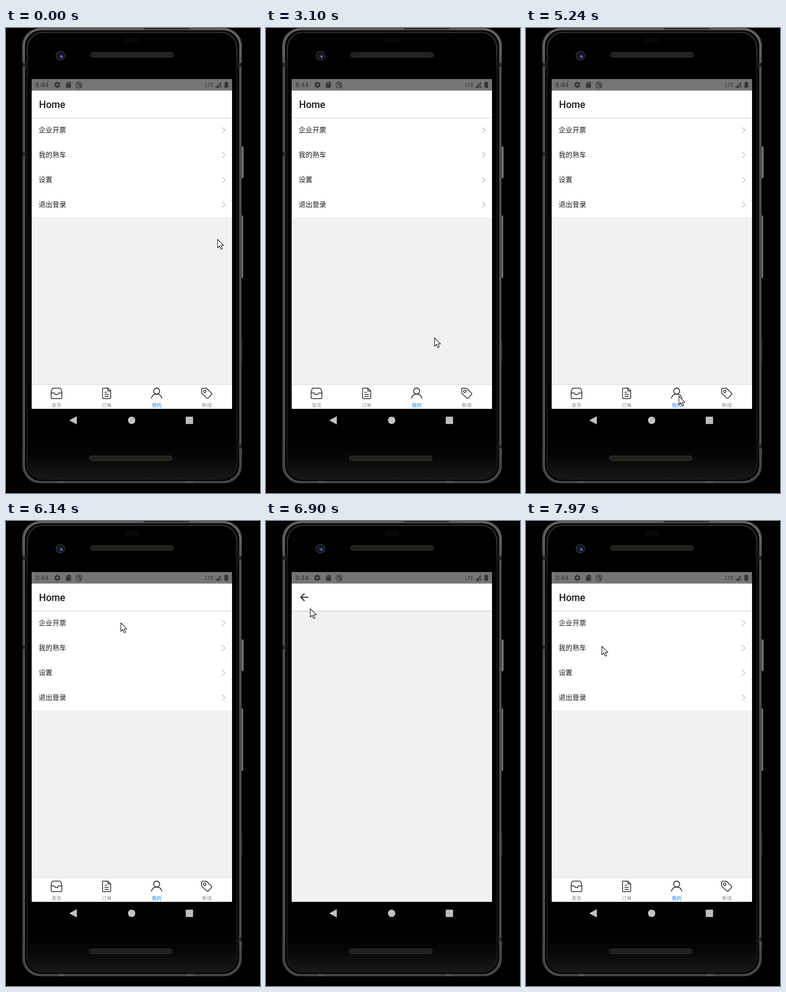
Animation of 554 by 1011 pixels, one loop 8000 ms. Source, as an HTML page with a canvas:

```html
<!DOCTYPE html>
<html lang="zh-CN">
<head>
<meta charset="utf-8">
<title>Phone tabs</title>
<style>
html, body { margin: 0; width: 100%; height: 100%; overflow: hidden; background: #000; }
canvas { display: block; width: 554px; height: 1011px; }
</style>
</head>
<body>
<canvas id="stage"></canvas>
<script>
const W = 554, H = 1011, LOOP = 8000;
const SCREEN = { x: 56, y: 136, w: 437, h: 692 };
const HEADER = 59, ROW = 54, TAB_Y = 776;
const CJK = '"Noto Sans CJK SC", "Noto Sans CJK", sans-serif';
const LATIN = 'Roboto, sans-serif';
const ROWS = ['企业开票', '我的熟车', '设置', '退出登录'];
const TABS = ['发货', '订单', '我的', '新增'];

// Event times in ms
const ADD_TAB = 3560, MINE_TAB = 5200, PUSH = 6371, POP = 7464, SLIDE = 425;

// Pointer path: time, x, y
const PATH = [
  [0, 461, 459], [450, 461, 459], [800, 385, 478], [1060, 323, 492], [1215, 323, 492],
  [1230, 320, 489], [1600, 320, 489], [1635, 322, 486], [1755, 322, 486],
  [1970, 454, 305], [2200, 541, 262], [2400, 500, 266], [2590, 420, 282],
  [2850, 300, 470], [3130, 375, 690], [3390, 433, 793], [3800, 433, 796],
  [4100, 385, 809], [4270, 361, 812], [4550, 333, 800], [5350, 333, 800],
  [5750, 300, 480], [6140, 250, 221], [6330, 140, 243], [6470, 129, 242],
  [6620, 127, 240], [7080, 82, 166], [7350, 82, 166], [7500, 137, 224],
  [7800, 165, 272], [8000, 165, 272]
];

const canvas = document.getElementById('stage');
const ctx = canvas.getContext('2d');
const dpr = window.devicePixelRatio || 1;
canvas.width = W * dpr;
canvas.height = H * dpr;

const clamp = v => Math.max(0, Math.min(1, v));

function rect(x, y, w, h, fill) {
  ctx.fillStyle = fill;
  ctx.fillRect(x, y, w, h);
}

function pill(x, y, w, h, r, fill, stroke, lw = 1) {
  ctx.beginPath();
  ctx.roundRect(x, y, w, h, r);
  if (fill) { ctx.fillStyle = fill; ctx.fill(); }
  if (stroke) { ctx.strokeStyle = stroke; ctx.lineWidth = lw; ctx.stroke(); }
}

function disc(x, y, r, fill) {
  ctx.beginPath();
  ctx.arc(x, y, r, 0, Math.PI * 2);
  ctx.fillStyle = fill;
  ctx.fill();
}

function line(d, stroke, lw, fill) {
  const p = new Path2D(d);
  if (fill) { ctx.fillStyle = fill; ctx.fill(p); }
  if (stroke) { ctx.strokeStyle = stroke; ctx.lineWidth = lw; ctx.stroke(p); }
}

function text(s, x, y, font, fill, align = 'left') {
  ctx.font = font;
  ctx.fillStyle = fill;
  ctx.textAlign = align;
  ctx.fillText(s, x, y);
}

function fade(x0, y0, x1, y1, ...colors) {
  const g = ctx.createLinearGradient(x0, y0, x1, y1);
  colors.forEach((c, i) => g.addColorStop(i / (colors.length - 1), c));
  return g;
}

function at(x, y, draw) {
  ctx.save();
  ctx.translate(x, y);
  draw();
  ctx.restore();
}

// Cubic bezier easing, solved by bisection
function ease(x) {
  const curve = (a, b, s) => 3 * (1 - s) * (1 - s) * s * a + 3 * (1 - s) * s * s * b + s ** 3;
  let lo = 0, hi = 1;
  for (let i = 0; i < 24; i++) {
    const mid = (lo + hi) / 2;
    if (curve(0.20833, 0.25, mid) < x) lo = mid; else hi = mid;
  }
  return curve(0.82, 1, (lo + hi) / 2);
}

// Hermite curve through the path, still at the rests
function pointer(t) {
  let i = 0;
  while (i < PATH.length - 2 && t >= PATH[i + 1][0]) i++;
  const a = PATH[i], b = PATH[i + 1], dt = b[0] - a[0], s = (t - a[0]) / dt;
  const slope = (k, n) => {
    const p = PATH[k - 1], c = PATH[k], q = PATH[k + 1];
    if (!p || !q) return 0;
    const before = (c[n] - p[n]) / (c[0] - p[0]), after = (q[n] - c[n]) / (q[0] - c[0]);
    return before * after <= 0 ? 0 : 2 * before * after / (before + after);
  };
  const mix = n => {
    const s2 = s * s, s3 = s2 * s;
    return (2 * s3 - 3 * s2 + 1) * a[n] + (s3 - 2 * s2 + s) * dt * slope(i, n)
      + (3 * s2 - 2 * s3) * b[n] + (s3 - s2) * dt * slope(i + 1, n);
  };
  return [mix(1), mix(2)];
}

function speaker(x, y) {
  pill(x + 0.5, y + 0.5, 181, 10, 5, '#1d1c19', '#484642');
  for (let i = 0; i < 57; i++) {
    for (let j = 0; j < 2; j++) rect(x + 6 + i * 3 + j * 1.5, y + 3 + j * 3, 1.4, 1.6, '#35332c');
  }
}

// Vertical metal shading: lit ends, even sides
function metal(top, side, bottom) {
  return fade(0, 0, 0, 990, top, top, side, side, side, side, side, side, side, side,
    side, side, side, side, side, side, side, side, side, bottom, bottom);
}

function phone() {
  rect(0, 0, W, H, '#000');

  // Side keys
  for (const [x, y, w, h] of [[512, 258, 6, 68], [512, 408, 5, 135]]) {
    pill(x, y, w, h, 1.5, fade(x, 0, x + w, 0, '#333', '#8a8a8a', '#555'), '#6e6e6e', 0.8);
  }
  rect(513, 679, 2, 49, '#3a3a3a');
  rect(513, 915, 2, 13, '#3a3a3a');

  // Metal rim
  pill(36.5, 1, 477, 988, 38, '#141414', metal('#9c9c9c', '#4c4c4c', '#6c6c6c'), 1.2);
  pill(39.5, 3.5, 471, 983, 36, null, metal('#7c7c7c', '#6a6a6a', '#5a5a5a'), 2.6);
  pill(43, 6.5, 464, 977, 35, null, '#0a0a0a', 4);
  pill(47, 9.5, 456, 971, 34, '#000', metal('#5c5c5c', '#161616', '#202020'), 1);
  pill(48, 890, 454, 90, [0, 0, 33, 33], fade(0, 890, 0, 980, '#000', '#070707', '#181818'));
  rect(300, 0, 115, 3, '#2a2a2a');
  rect(400, 0, 14, 5, '#555');
  rect(113, 985, 15, 4, '#555');
  rect(393, 985, 15, 4, '#555');
  for (const [x, y] of [[36, 75], [36, 269], [507, 75], [507, 904]]) {
    rect(x, y, 7, 11, '#252525');
    rect(x, y, 7, 1, '#555');
    rect(x, y + 10, 7, 1, '#555');
  }

  // Front details
  pill(259, 22, 31, 11, 4, '#08080c');
  disc(118.5, 60, 10.5, '#2b2b2d');
  disc(118.5, 60, 8, '#131318');
  disc(119.5, 61, 5, '#191d42');
  disc(120.5, 61.5, 2.8, '#3a4791');
  disc(121.5, 62.5, 1.3, '#a6b4f2');
  speaker(184, 53);
  speaker(181, 930);

  // System navigation
  line('M138 853L154.5 844V862Z', null, 0, '#c3c3c3');
  disc(274, 853, 8, '#c3c3c3');
  pill(392, 845, 16, 16, 1, '#bdbdbd');
}

function statusBar() {
  const ink = '#363636';
  rect(SCREEN.x, 111, SCREEN.w, 25, '#757575');
  text('8:44', 64, 129, '15px ' + LATIN, ink);
  text('LTE', 434.5, 128, '11.5px ' + LATIN, ink);

  at(112, 123.5, () => {
    for (let i = 0; i < 6; i++) {
      ctx.rotate(Math.PI / 3);
      rect(-2, -6.8, 4, 4, ink);
    }
    disc(0, 0, 5.2, ink);
    disc(0, 0, 2.3, '#757575');
  });

  line('M134.5 117H140.5Q141.5 117 141.5 118V129Q141.5 130 140.5 130H131.5Q130.5 130 130.5 129V121Z', null, 0, ink);
  for (let i = 0; i < 3; i++) rect(133.8 + i * 2.2, 118.5, 1.1, 2.8, '#757575');

  pill(152.5, 117, 13.5, 13.5, 7, null, ink, 1.4);
  line('M156 124A3.3 3.3 0 1 1 160 127M158.5 123L163.5 128.5', ink, 1.8);

  line('M456 130L469 117.5V123L464.5 124V130Z', null, 0, ink);
  line('M466 125.5L469.5 129.5M469.5 125.5L466 129.5', ink, 1.2);
  pill(476.5, 118, 8, 12, 1, ink);
  rect(478.5, 116.5, 4, 2, ink);
}

function header() {
  const { x, y, w } = SCREEN;
  rect(x, y + HEADER, w, 4, fade(0, y + HEADER, 0, y + HEADER + 4, '#0000002a', '#0000000a', '#00000000'));
  rect(x, y, w, HEADER, '#fff');
}

const icons = [
  () => line('M-7.5 -11.5H7.5Q8.8 -11.5 9.3 -10.3L11.7 -3.5V9Q11.7 11.3 9.4 11.3H-9.4Q-11.7 11.3 -11.7 9V-3.5L-9.3 -10.3Q-8.8 -11.5 -7.5 -11.5Z'
    + 'M-11.5 -1H-5Q-4 -1 -3.6 0.5Q-3 2.5 -1 2.5H1Q3 2.5 3.6 0.5Q4 -1 5 -1H11.5', '#111', 1.5),
  () => line('M-7 -11.5H3L9 -5.5V9.3Q9 11.3 7 11.3H-6.8Q-8.8 11.3 -8.8 9.3V-9.5Q-8.8 -11.5 -7 -11.5Z'
    + 'M2.8 -11.3V-5.3H8.8M-4.5 -2.5H1M-4.5 2H4.8M-4.5 6.5H4.8', '#111', 1.5),
  () => line('M6.6 -5A6.6 6.6 0 1 1 -6.6 -5A6.6 6.6 0 1 1 6.6 -5M-11.3 11C-10.5 4.5 -6 1.5 0 1.5S10.5 4.5 11.3 11', '#111', 1.6),
  () => line('M-9.5 -11.2L-2 -11.3Q-0.8 -11.3 0.2 -10.4L10.6 -0.3Q11.8 1 10.6 2.3L3 10.2Q1.7 11.4 0.4 10.2L-10.2 0.3Q-11 -0.5 -11 -1.8L-11.2 -9.5Q-11.2 -11.2 -9.5 -11.2Z'
    + 'M-1.6 -4.5A2.7 2.7 0 1 1 -7 -4.5A2.7 2.7 0 1 1 -1.6 -4.5', '#111', 1.5)
];

function tabBar(active) {
  const { x, w } = SCREEN, step = w / 4;
  rect(x, TAB_Y - 3, w, 3, fade(0, TAB_Y - 3, 0, TAB_Y, '#00000000', '#00000016'));
  rect(x, TAB_Y, w, 52, '#fff');
  TABS.forEach((name, i) => {
    const cx = x + step * (i + 0.5) - 0.5;
    at(cx, 794.5, icons[i]);
    text(name, cx, 824, '10.7px ' + CJK, i === active ? '#1a7ff0' : '#8c8c8c', 'center');
  });
}

function home(active) {
  const { x, y, w, h } = SCREEN, top = y + HEADER;
  rect(x, y, w, h + 20, '#f1f1f1');
  if (active === 2) {
    rect(x, top, w, ROW * ROWS.length, '#fff');
    ROWS.forEach((name, i) => {
      const cy = top + ROW * (i + 0.5);
      text(name, 71.3, cy + 5, '15px ' + CJK, '#1c1c1c');
      line(`M471.5 ${cy - 6}L478 ${cy}L471.5 ${cy + 6}`, '#b5b5b5', 1.2);
    });
  } else {
    text('新增页面', 55.5, 210, '15px ' + CJK, '#1c1c1c');
  }
  header();
  text('Home', 72, 174, '500 21.3px ' + LATIN, '#1c1c1e');
  tabBar(active);
}

function detail() {
  const { x, y, w, h } = SCREEN;
  rect(x, y, w, h, '#f1f1f1');
  header();
  line('M92.5 165.7H76M84 157.5L75.8 165.7L84 173.9', '#1c1c1e', 2.1);
}

function screen(t) {
  const { x, y, w, h } = SCREEN;
  const active = t >= ADD_TAB && t < MINE_TAB ? 3 : 2;
  const open = t < POP ? ease(clamp((t - PUSH) / SLIDE)) : 1 - ease(clamp((t - POP) / SLIDE));

  ctx.save();
  ctx.beginPath();
  ctx.rect(x, y, w, h);
  ctx.clip();
  at(0, -0.02 * h * open, () => home(active));
  if (open > 0.001) {
    rect(x, y, w, h, `rgba(0,0,0,${0.1 * clamp(open / 0.36)})`);
    ctx.beginPath();
    ctx.rect(x, y + (1 - open) * h, w, h);
    ctx.clip();
    rect(x, y, w, h, '#f1f1f1');
    at(0, 0.041 * h * (1 - open), detail);
  }
  ctx.restore();
}

function cursor(t) {
  const [x, y] = pointer(t);
  at(Math.round(x) + 0.5, Math.round(y) + 0.5, () => {
    line('M0 0V18.5L4.3 14.5L7.4 21.5L10.4 20.2L7.4 13.3H13.3Z', '#111', 1.2, '#fff');
  });
}

const start = performance.now();

function frame() {
  const t = (performance.now() - start) % LOOP;
  ctx.setTransform(dpr, 0, 0, dpr, 0, 0);
  ctx.lineJoin = 'round';
  phone();
  statusBar();
  screen(t);
  cursor(t);
  requestAnimationFrame(frame);
}
frame();
</script>
</body>
</html>
```
